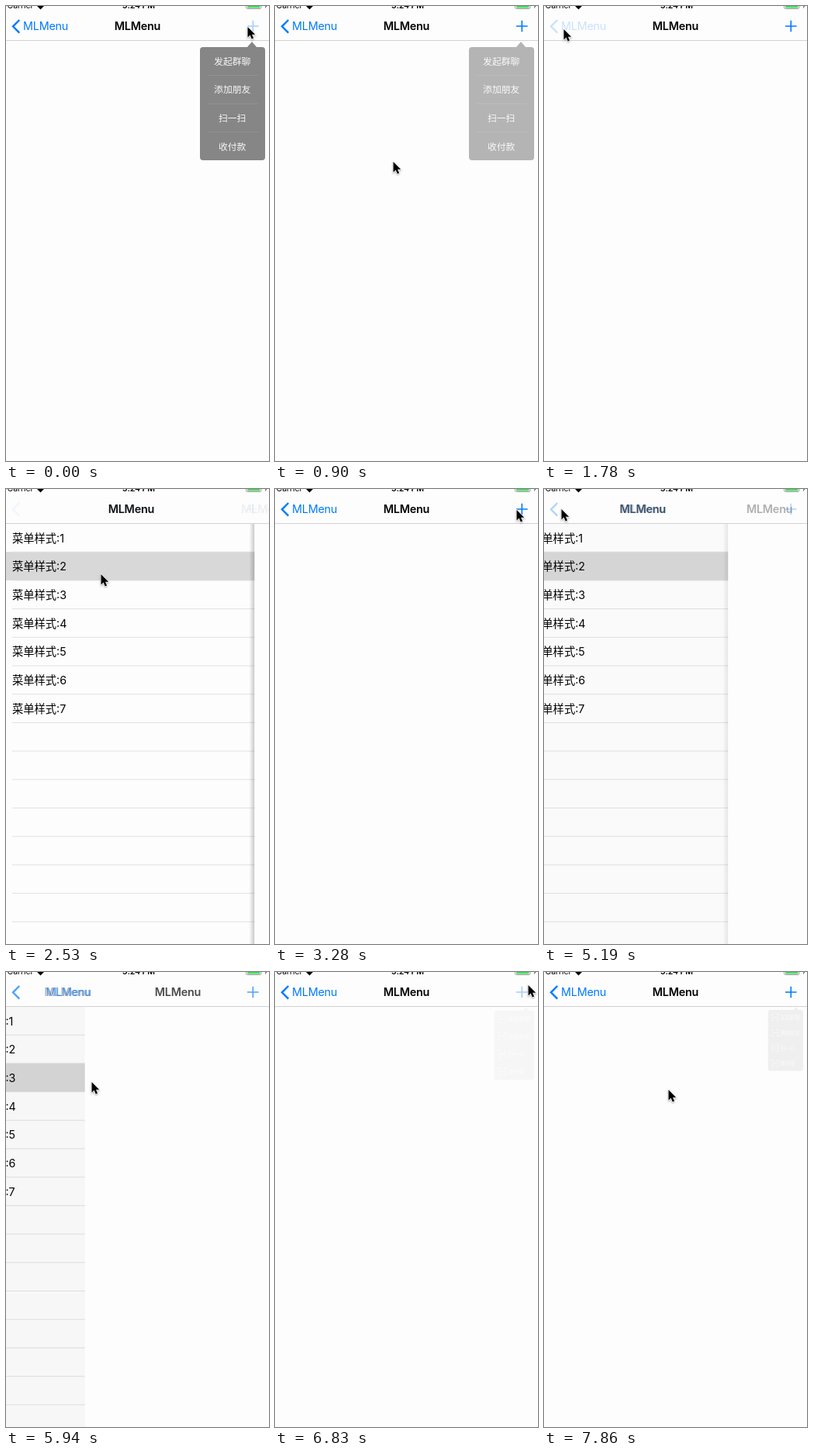
An HTML page for the animation above (8000 ms loop, 339x587 px).

```html
<!DOCTYPE html>
<html lang="zh">
<head>
<meta charset="utf-8">
<style>
html, body { margin: 0; height: 100%; overflow: hidden; background: #fdfdfd; }
svg { display: block; font-family: Inter, "Noto Sans CJK SC", "Noto Sans CJK JP", "Noto Sans CJK", sans-serif; }
.title { font-size: 14.4px; font-weight: 600; letter-spacing: -.25px; text-anchor: middle; }
.back { font-size: 14.4px; letter-spacing: -.25px; fill: #007aff; }
.row { font-size: 14.3px; }
.item { font-size: 11.8px; fill: #f4f4f4; }
.status { font-size: 10.6px; letter-spacing: -.1px; }
.blue { stroke: #007aff; fill: none; }
</style>
</head>
<body>
<svg width="339" height="587" viewBox="0 0 339 587">
  <defs>
    <linearGradient id="shade">
      <stop offset="0" stop-opacity="0"/><stop offset="1"/>
    </linearGradient>
    <path id="scan" d="M-7.5-3.5V-7.5H-3.5M3.5-7.5H7.5V-3.5M7.5 3.5V7.5H3.5M-3.5 7.5H-7.5V3.5M-8 0H8" fill="none" stroke="#e4e4e4" stroke-width="1.4"/>
  </defs>
  <rect width="339" height="587" fill="#fdfdfd"/>
  <g id="list">
    <rect id="mark" width="345" height="36.7" fill="#d8d8d8"/>
    <g id="rows"></g>
  </g>
  <rect id="listDim" y="45" width="339" height="542"/>
  <g id="page">
    <rect id="edge" x="-7" y="45" width="7" height="542" fill="url(#shade)"/>
    <rect y="45" width="339" height="542" fill="#fdfdfd"/>
  </g>
  <rect id="dim" y="45" width="339" height="542"/>

  <rect width="339" height="44" fill="#fdfdfd"/>
  <path d="M0 44.5H339" stroke="#d2d2d4"/>
  <g class="status">
    <text x="1.5" y="3">Carrier</text>
    <path d="M40 0Q44.5-4 49 0L44.5 4.5Z"/>
    <text x="171" y="3" text-anchor="middle" font-weight="600">5:24 PM</text>
    <rect x="309.5" y="-6" width="19.5" height="9.5" rx="2" fill="#fff" stroke="#999"/>
    <rect x="311" y="-5" width="16.5" height="7.5" rx="1" fill="#4cd964"/>
    <path d="M337-2L334 3.5L335-1Z"/>
  </g>
  <text id="listTitle" class="title" y="31">MLMenu</text>
  <text id="backText" class="back" y="31">MLMenu</text>
  <text id="pageTitle" class="title" y="31">MLMenu</text>
  <path id="chevron" class="blue" d="M17.3 18L9 26.3L17.3 34.6" stroke-width="2.4"/>
  <path id="plus" class="blue" d="M311 26H325.6M318.3 18.7V33.3" stroke-width="1.6"/>

  <g id="menu">
    <path d="M254 53H311L317 46L323 53H330a4 4 0 0 1 4 4V195a4 4 0 0 1-4 4H254a4 4 0 0 1-4-4V57a4 4 0 0 1 4-4Z" fill="#4a4a4b"/>
    <path d="M259.5 89.5H325M259.5 126H325M259.5 162.5H325" stroke="#5e5e60" stroke-width=".8"/>
    <g id="plain" text-anchor="middle"></g>
    <g id="icons"></g>
  </g>
  <path id="cursor" d="M0 0V13.5L3.1 10.6L5.2 15.6L7.6 14.5L5.5 9.7H9.7Z" stroke="#fff" stroke-width="1.4" paint-order="stroke" style="filter:drop-shadow(0 1px 1px #0005)"/>
</svg>
<script>
// Times below are counted in screen updates of STEP ms
const LOOP = 8000, STEP = 148.3, W = 339, ROW = 36.7, TOP = 44.5, TRAVEL = 3;
const el = id => document.getElementById(id);
const set = (id, attrs) => { for (const a in attrs) el(id).setAttribute(a, attrs[a]); };
const clamp = v => Math.min(1, Math.max(0, v));
const last = (events, k) => events.findLast(e => e.at <= k);

const PLUS = { x: 311, y: 27 };
const stops = [
  { ...PLUS, at: -9 }, { x: 152, y: 201, at: 0 }, { x: 25, y: 30, at: 8 }, { x: 122, y: 110, at: 14 },
  { ...PLUS, at: 19 }, { x: 143, y: 157, at: 23 }, { x: 22, y: 26, at: 30 }, { x: 110, y: 142, at: 35 },
  { x: 326, y: 17, at: 42 }, { x: 160, y: 152, at: 47 }];
const slides = [
  { at: -9, push: true, row: 0 }, { at: 12, push: false, row: 0 }, { at: 16.87, push: true, row: 1 },
  { at: 34, push: false, row: 1 }, { at: 39, push: true, row: 2 }];
const menus = [
  { at: -.66, close: 5.4 },
  { at: 23.4, close: 28, icons: true, dims: true },
  { at: 45.97, close: 52.075, icons: true, zooms: true }];

for (let i = 0; i < 15; i++) {
  const y = TOP + ROW * i;
  const label = i < 7 ? `<text class="row" x="13.5" y="${y + 24}">菜单样式:${i + 1}</text>` : '';
  el('rows').innerHTML += `${label}<path d="M13.5 ${y + ROW}H380" stroke="#dfdfe2" stroke-width=".9"/>`;
}
['发起群聊', '添加朋友', '扫一扫', '收付款'].forEach((name, i) => {
  const y = 71 + ROW * i, text = x => `<text class="item" x="${x}" y="${y + 4.5}">${name}</text>`;
  el('plain').innerHTML += text(291.7);
  el('icons').innerHTML += `<use href="#scan" x="267" y="${y}"/>${text(279.5)}`;
});

function drawSlide(k, plusHeld) {
  const { at, push, row } = last(slides, k);
  const rest = .3 ** ((k - at) ** 1.5);
  const q = push ? 1 - rest : rest;
  set('list', { transform: `translate(${-.3 * W * q})` });
  set('mark', { y: TOP + ROW * row, opacity: push ? 1 : clamp(4 * q) });
  set('listDim', { opacity: .035 * q });
  set('page', { transform: `translate(${W * (1 - q)})` });
  set('edge', { opacity: .25 * (1 - q) ** 3 });

  const titleX = 169.5 - 120 * q * (1.25 - .25 * q);
  const back = !push && k === at ? .2 : q;
  set('listTitle', { x: titleX, opacity: 1 - q });
  set('backText', { x: titleX - 27.5, opacity: back });
  set('pageTitle', { x: 169.5 + 173 * (1 - q), opacity: q });
  set('chevron', { opacity: back });
  set('plus', { opacity: plusHeld ? .35 : q });
}

function drawMenu(k, { at, close, icons, dims, zooms }) {
  const alpha = clamp(k - at) - clamp(k - close);
  const small = k < close ? .6 : .5;
  const scale = zooms ? small + (1 - small) * alpha : 1;
  set('dim', { opacity: dims ? .33 * alpha : 0 });
  set('menu', { opacity: alpha, transform: `translate(334 44.4) scale(${scale}) translate(-334 -44.4)` });
  set('plain', { opacity: icons ? 0 : 1 });
  set('icons', { opacity: icons ? 1 : 0 });
}

function drawCursor(k) {
  const to = last(stops, k), from = stops[stops.indexOf(to) - 1] || to;
  const p = clamp((k - to.at) / TRAVEL), e = p * p * (3 - 2 * p);
  set('cursor', { transform: `translate(${from.x + (to.x - from.x) * e + .5} ${from.y + (to.y - from.y) * e})` });
}

function draw(k) {
  drawSlide(k, menus.some(m => Math.abs(k - m.at) < .7));
  drawMenu(k, last(menus, k));
  drawCursor(k);
}

const start = performance.now();
function tick() {
  const t = (performance.now() - start) % LOOP;
  draw(Math.floor((t + 4) / STEP));
  requestAnimationFrame(tick);
}
tick();
</script>
</body>
</html>
```
